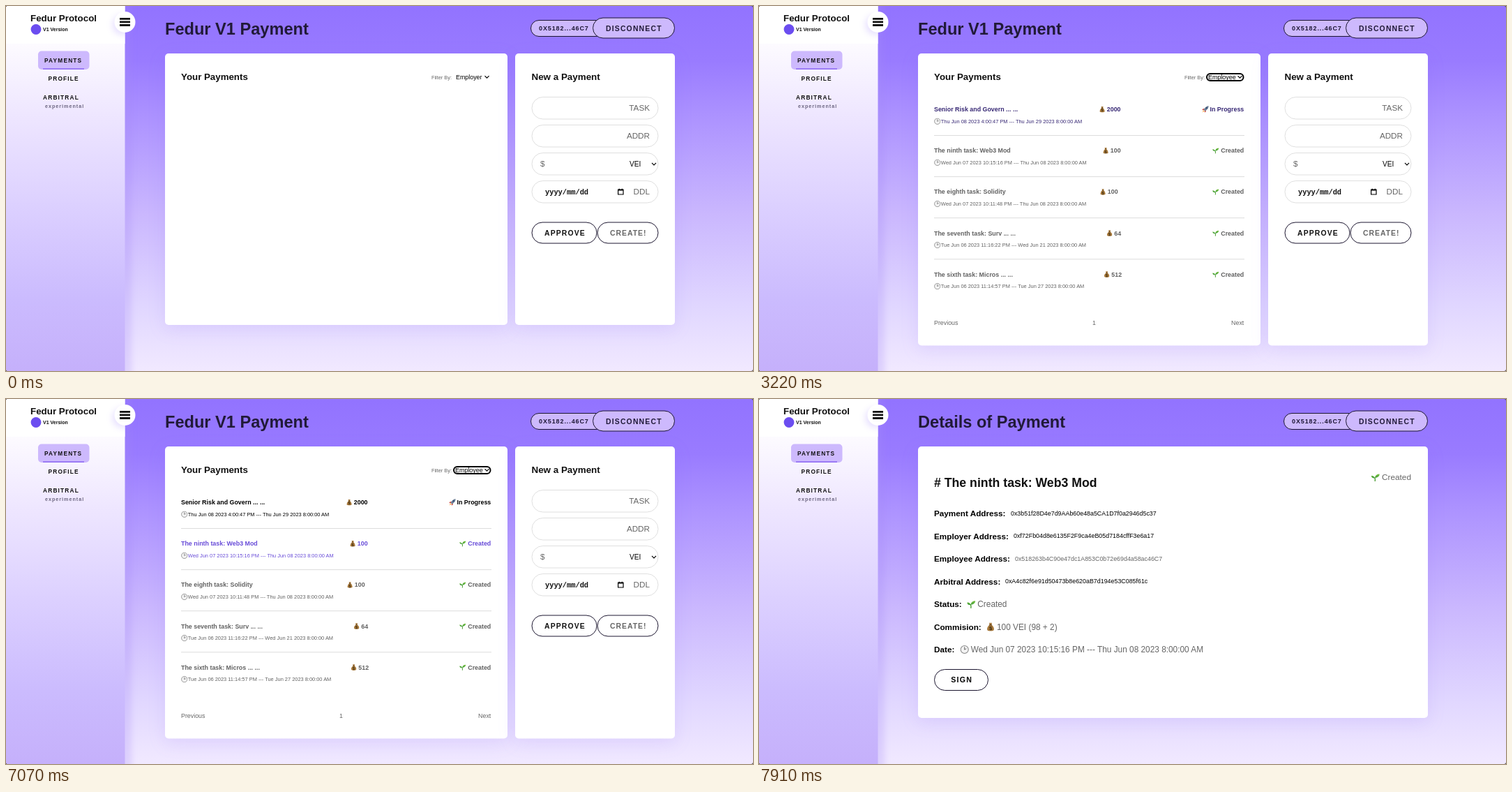
Recreate the animation shown at these times as an HTML page. Size 1071x523 px, loop 8 s.

```html
<!DOCTYPE html>
<html lang="en">
<head>
<meta charset="utf-8">
<title>Payments</title>
<style>
  html, body { margin: 0; width: 100%; height: 100%; overflow: hidden; background: #444; }
  svg { display: block; width: 1071px; height: 523px; border-radius: 3px; font-family: "Liberation Sans", Arial, sans-serif; }
  .b { font-weight: 700; }
  .m { font-family: "Liberation Mono", monospace; font-weight: 700; }
  .card { fill: #fff; filter: drop-shadow(0 6px 12px rgba(120, 85, 240, .12)); }
  .line { fill: none; stroke: #000; stroke-width: 1.2; }
</style>
</head>
<body>
<svg id="stage" viewBox="0 0 1071 523" xmlns="http://www.w3.org/2000/svg"></svg>
<script>
const LOOP = 8000;
const GREY = '#666', INK = '#111', HEAD = '#211a38', LILAC = '#cdb9fd';

// Drawing helpers
const text = (x, y, size, str, o = {}) =>
  `<text x="${x}" y="${y}" font-size="${size}" class="${o.c ?? 'b'}"` +
  (o.fill ? ` fill="${o.fill}"` : '') +
  (o.ls ? ` letter-spacing="${o.ls}"` : '') +
  (o.end ? ' text-anchor="end"' : '') + `>${str}</text>`;
const plain = (x, y, size, str, fill, end) => text(x, y, size, str, { c: '', fill, end });
const box = (x, y, w, h, r, attrs) => `<rect x="${x}" y="${y}" width="${w}" height="${h}" rx="${r}" ${attrs}/>`;
const pill = (x, y, w, h, fill = '#fff', stroke = '#1c1630') =>
  box(x + .5, y + .5, w - 1, h - 1, (h - 1) / 2, `fill="${fill}" stroke="${stroke}"`);
const icon = (id, x, y, s) => `<use href="#${id}" x="${x}" y="${y}" width="${s}" height="${s}"/>`;
const chevron = (x, y) => `<path class="line" d="M${x} ${y}l3 3 3-3"/>`;
const group = (id, body) => `<g id="${id}">${body}</g>`;
const stops = list => list.map(([at, col]) => `<stop offset="${at}" stop-color="${col}"/>`).join('');
const fade = (id, list) => `<linearGradient id="${id}" x2="0" y2="1">${stops(list)}</linearGradient>`;

const defs = `<defs>
  ${fade('sky', [[0, '#9273ff'], [.15, '#997bff'], [.3, '#ac92ff'], [.57, '#cab7fe'], [.82, '#e0d6ff'], [1, '#f1e9ff']])}
  ${fade('side', [[0, '#fff'], [.1, '#fdfbff'], [.3, '#eee6ff'], [.55, '#dcd0ff'], [.8, '#cbbbfe'], [1, '#c5b0fb']])}
  ${fade('leaf', [[0, '#7cc243'], [1, '#3c9a35']])}
  <symbol id="sprout" viewBox="0 0 10 10">
    <path d="M4.6 9.6Q4.9 7 4.3 5" fill="none" stroke="#4c9d33" stroke-width="1.1"/>
    <path d="M4.4 5.6Q5 1.2 9.8 1.2 9.6 5 4.4 5.6ZM4.4 6Q3.4 2.6.2 3.2.8 6.4 4.4 6Z" fill="url(#leaf)"/>
  </symbol>
  <symbol id="bag" viewBox="0 0 10 10">
    <path d="M3.3.5h3.4L6 2.6Q9.2 5 8.9 8 8.7 9.8 5 9.8T1.1 8Q.8 5 4 2.6Z" fill="#a87a3c"/>
    <path d="M3.6 2.7h2.8" stroke="#5d3d18" stroke-width=".9"/>
    <text x="5" y="8.6" font-size="6" font-weight="700" text-anchor="middle" fill="#3c2a10">$</text>
  </symbol>
  <symbol id="rocket" viewBox="0 0 10 10">
    <path d="M3.6 4.1 1.2 4.6.4 6.2l2.2-.1ZM5.9 6.4 5.4 8.8 3.8 9.6l.1-2.2Z" fill="#c9362f"/>
    <path d="M9.7.3Q5.3.4 2.6 5.6L4.4 7.4Q9.6 4.7 9.7.3Z" fill="#6d7f95"/>
    <circle cx="6.8" cy="3.2" r="1.1" fill="#2d4a78"/>
    <path d="M2.5 6.3.6 9.4 3.7 7.5Z" fill="#f59a23"/>
  </symbol>
  <symbol id="clock" viewBox="0 0 10 10">
    <circle cx="5" cy="5" r="4.4" fill="#f3f3f3" stroke="#8a8a8a" stroke-width=".9"/>
    <path d="M5 2v3.1L7 4" fill="none" stroke="#555" stroke-width=".7"/>
  </symbol>
  <filter id="soft" x="-1" y="-1" width="3" height="3"><feGaussianBlur stdDeviation="4"/></filter>
</defs>`;

// Sidebar and page background
const backdrop = box(0, 0, 1071, 523, 0, 'fill="url(#sky)"') +
  box(160, -20, 20, 570, 0, 'fill="#a488f5" opacity=".25" filter="url(#soft)"') +
  box(0, 0, 170.5, 523, 0, 'fill="url(#side)"') +
  box(0, 0, 170.5, 54, 0, 'fill="#fff"') +
  '<circle cx="167" cy="27" r="15" fill="#9f83ff" opacity=".22" filter="url(#soft)"/>' +
  '<circle cx="170.5" cy="23" r="15" fill="#fff"/>' +
  '<path d="M163 18.3h15M163 22.9h15M163 27.5h15" stroke="#111" stroke-width="2.8"/>' +
  box(46, 64.5, 73.5, 26.5, 5, `fill="${LILAC}"`) +
  '<path d="M53 90.2h59" stroke="#7d55f0" stroke-width="1.2"/>';

const menu = text(35, 21.6, 13.36, 'Fedur Protocol', { fill: INK }) +
  text(55, 80.7, 8.3, 'PAYMENTS', { fill: INK, ls: 1.2 }) +
  text(60.5, 107.4, 8.3, 'PROFILE', { fill: INK, ls: 1.2 }) +
  text(53, 134, 8.3, 'ARBITRAL', { fill: INK, ls: 1.2 }) +
  text(56, 146, 7.2, 'experimental', { fill: '#6c6681', ls: .98 });

const online = '<circle cx="43" cy="33.5" r="7.4" fill="#6b4df0"/>' +
  text(53, 36.3, 7, 'V1 Version', { fill: INK }) +
  pill(752, 20, 106, 24, LILAC) +
  text(764, 35.2, 9, '0X5182...46C7', { fill: HEAD, ls: .9 }) +
  pill(841, 16.5, 118, 30, LILAC) +
  text(860, 35.5, 10.4, 'DISCONNECT', { fill: HEAD, ls: 1.2 });
const offline = plain(53, 35.8, 7.3, 'V1 Version', INK) +
  pill(841, 16.5, 118, 30, LILAC) +
  text(871, 35.3, 10.4, 'CONNECT', { fill: HEAD, ls: 1.2 });

// Payments page
const field = (y, label) => pill(753.5, y, 182, 32.5, '#fff', '#dfdfdf') +
  (label ? plain(923, y + 20.3, 11.7, label, GREY, true) : '');
const form = text(753.5, 106.3, 13.4, 'New a Payment', { fill: INK }) +
  field(130, 'TASK') + field(170, 'ADDR') + field(210) + field(250, 'DDL') +
  plain(766, 230.3, 11.7, '$', GREY) + plain(894, 229.6, 10.1, 'VEI', '#000') + chevron(926, 224.8) +
  text(773, 269.5, 10.35, 'yyyy/mm/dd', { c: 'm', fill: '#111' }) +
  '<path d="M877.6 263.2h7.4v6.8h-7.4zM877.6 264h7.4M879.3 261.8v1.4M883.3 261.8v1.4" class="line"/>' +
  pill(753.5, 309.5, 94, 31) + text(772, 328.8, 10.4, 'APPROVE', { fill: INK, ls: 1.15 }) +
  pill(847.5, 309.5, 88, 31) + text(866, 328.8, 10.4, 'CREATE!', { fill: GREY, ls: 1 });

const payments = text(228, 40.6, 23.6, 'Fedur V1 Payment', { fill: HEAD }) +
  ['228,491', '730,229'].map(p => {
    const [x, w] = p.split(',');
    return box(x, 68, w, 389, 5, 'class="card tall"');
  }).join('') +
  text(251, 106.3, 13.3, 'Your Payments', { fill: INK }) +
  plain(610, 104.8, 7.35, 'Filter By:', GREY) + chevron(686.5, 100.2) +
  group('byEmployer', plain(645, 105, 8.9, 'Employer', '#000')) +
  group('byEmployee', box(642, 97, 52.5, 10, 5, 'fill="none" stroke="#000" stroke-width="2"') +
    plain(644, 105, 8.95, 'Employee', '#000')) + form;

const tail = ' 2023 8:00:00 AM';
const rows = [
  ['Senior Risk and Govern ... ...', 'Thu Jun 08 2023 4:00:47 PM --- Thu Jun 29', 488, 2000],
  ['The ninth task: Web3 Mod', 'Wed Jun 07 2023 10:15:16 PM --- Thu Jun 08', 493, 100],
  ['The eighth task: Solidity', 'Wed Jun 07 2023 10:11:48 PM --- Thu Jun 08', 489, 100],
  ['The seventh task: Surv ... ...', 'Tue Jun 06 2023 11:16:22 PM --- Wed Jun 21', 498.5, 64],
  ['The sixth task: Micros ... ...', 'Tue Jun 06 2023 11:14:57 PM --- Tue Jun 27', 494.5, 512],
];
const list = rows.map(([name, dates, x, sum], i) => {
  const y = 148 + 59.1 * i;
  return group('row' + i,
    text(251, y + 3.2, 8.9, name) + icon('clock', 251, y + 12.5, 9.5) +
    plain(260.8, y + 20, 7.43, dates + tail) +
    icon('bag', x - .5, y - 4.5, 9.2) + text(x + 10.8, y + 3.2, 8.9, sum) +
    (i ? icon('sprout', 650, y - 4.8, 9.5) : icon('rocket', 635, y - 5, 10)) +
    text(695.3, y + 3.2, 8.9, i ? 'Created' : 'In Progress', { end: true })) +
    (i < 4 ? `<path d="M251 ${y + 37.5}h445" stroke="#dcdcdc"/>` : '');
}).join('') +
  plain(251, 457, 8.85, 'Previous', GREY) + plain(478, 457, 8.85, '1', GREY) +
  plain(695.3, 457, 8.85, 'Next', GREY, true);

const popup = box(632, 90, 76, 44, 8, 'fill="#000" opacity=".16" filter="url(#soft)"') +
  box(634.5, 89.5, 71, 39.5, 5, 'fill="#e0dee3" stroke="#c2c0c6"') +
  box(639, 109.5, 62.5, 15.5, 3.5, 'id="mark" fill="#4a9cf8"') +
  '<path id="tick" class="line" d="M642.5 102.3l2.3 3 4-6.4" style="stroke-width:1.5"/>' +
  group('optA', plain(653, 105.2, 9.1, 'Employer')) + group('optB', plain(653, 120.7, 9.1, 'Employee'));

// Details page
const facts = [
  ['Payment Address:', 361, '0x3b51f28D4e7d9AAb60e48a5CA1D7f0a2946d5c37'],
  ['Employer Address:', 365, '0xf72Fb04d8e6135F2F9ca4eB05d7184cffF3e6a17'],
  ['Employee Address:', 367, '0x518263b4C90e47dc1A853C0b72e69d4a58ac46C7', GREY],
  ['Arbitral Address:', 353, '0xA4c82f6e91d50473b8e620aB7d194e53C085f61c'],
  ['Status:', 313.3, 'Created', 'sprout'],
  ['Commision:', 341, '100 VEI (98 + 2)', 'bag'],
  ['Date:', 303.7, 'Wed Jun 07 2023 10:15:16 PM --- Thu Jun 08' + tail, 'clock'],
];
const details = text(251, 126, 17.7, '# The ninth task: Web3 Mod', { fill: INK }) +
  icon('sprout', 877.5, 106, 12.5) + plain(893, 116.3, 11.8, 'Created', GREY) +
  facts.map(([label, x, value, kind], i) => {
    const y = 168 + 32.5 * i;
    return text(251, y, 11.73, label, { fill: '#000' }) + (i < 4
      ? plain(x, y - 1.2, 8.9, value, kind ?? '#000')
      : icon(kind, x - 15.3, y - 10.3, 12.6) + plain(x, y, 11.85, value, GREY));
  }).join('') +
  pill(251, 387, 78, 31) + text(275.3, 406.3, 10.6, 'SIGN', { fill: '#000', ls: 1.2 });
const detailPage = text(228, 40.6, 23.6, 'Details of Payment', { fill: HEAD, }) +
  box(228, 68, 731, 389, 5, 'class="card" id="sheet"') +
  group('pending', text(251, 125.3, 17.7, '# undefined', { fill: INK })) + group('loaded', details);

const stage = document.getElementById('stage');
stage.innerHTML = defs + backdrop + group('menu', menu) + group('online', online) + group('offline', offline) +
  group('payments', payments + group('list', list) + group('popup', popup)) + group('details', detailPage);
const $ = id => document.getElementById(id);

// Timeline in ms
const OPEN = 1890, MOVE = 2240, CLICK = 2660, CLOSE = 2870, LIST = 3010, PAGE = 7210, LINK = 7490, DATA = 7560;
const hovers = [[0, 3080, 4060], [1, 4060, 4200], [2, 4200, 4550], [1, 4550, LOOP]];
const EASE = 260;

const clamp = v => Math.max(0, Math.min(1, v));
const show = (id, on) => $(id).setAttribute('visibility', on ? 'inherit' : 'hidden');
const mix = (a, b, k) => `rgb(${a.map((v, i) => Math.round(v + (b[i] - v) * k))})`;

function render(t) {
  const isDetail = t >= PAGE, isLinked = !isDetail || t >= LINK, hasData = t >= DATA;
  show('payments', !isDetail);
  show('details', isDetail);
  show('online', isLinked);
  show('offline', !isLinked);
  $('menu').setAttribute('transform', `translate(0 ${isLinked ? 0 : -.4})`);
  show('pending', !hasData);
  show('loaded', hasData);
  $('sheet').setAttribute('height', hasData ? 389 : 103.5);

  const isPicked = t >= CLOSE;
  show('byEmployer', !isPicked);
  show('byEmployee', isPicked);
  show('list', t >= LIST);
  for (const card of document.querySelectorAll('.tall')) card.setAttribute('height', t >= LIST ? 418.5 : 389);

  const fadeOut = 1 - clamp((t - CLOSE) / 140);
  show('popup', t >= OPEN && fadeOut > 0);
  $('popup').setAttribute('opacity', fadeOut);
  const isLow = t >= MOVE, isLit = t < CLICK || t >= CLICK + 70;
  show('mark', isLit);
  $('mark').setAttribute('y', isLow ? 109.5 : 93.8);
  $('optA').setAttribute('fill', isLow ? '#111' : '#fff');
  $('tick').style.stroke = isLow ? '#111' : '#fff';
  $('optB').setAttribute('fill', isLow && isLit ? '#fff' : '#111');

  rows.forEach((_, i) => {
    const k = hovers.filter(h => h[0] === i)
      .reduce((sum, [, from, to]) => sum + clamp((t - from) / EASE) - clamp((t - to) / EASE), 0);
    $('row' + i).setAttribute('fill', mix(i ? [98, 98, 98] : [0, 0, 0], [104, 76, 216], clamp(k)));
  });
}

const start = performance.now();
function tick() {
  render((performance.now() - start) % LOOP);
  requestAnimationFrame(tick);
}
tick();
</script>
</body>
</html>
```
